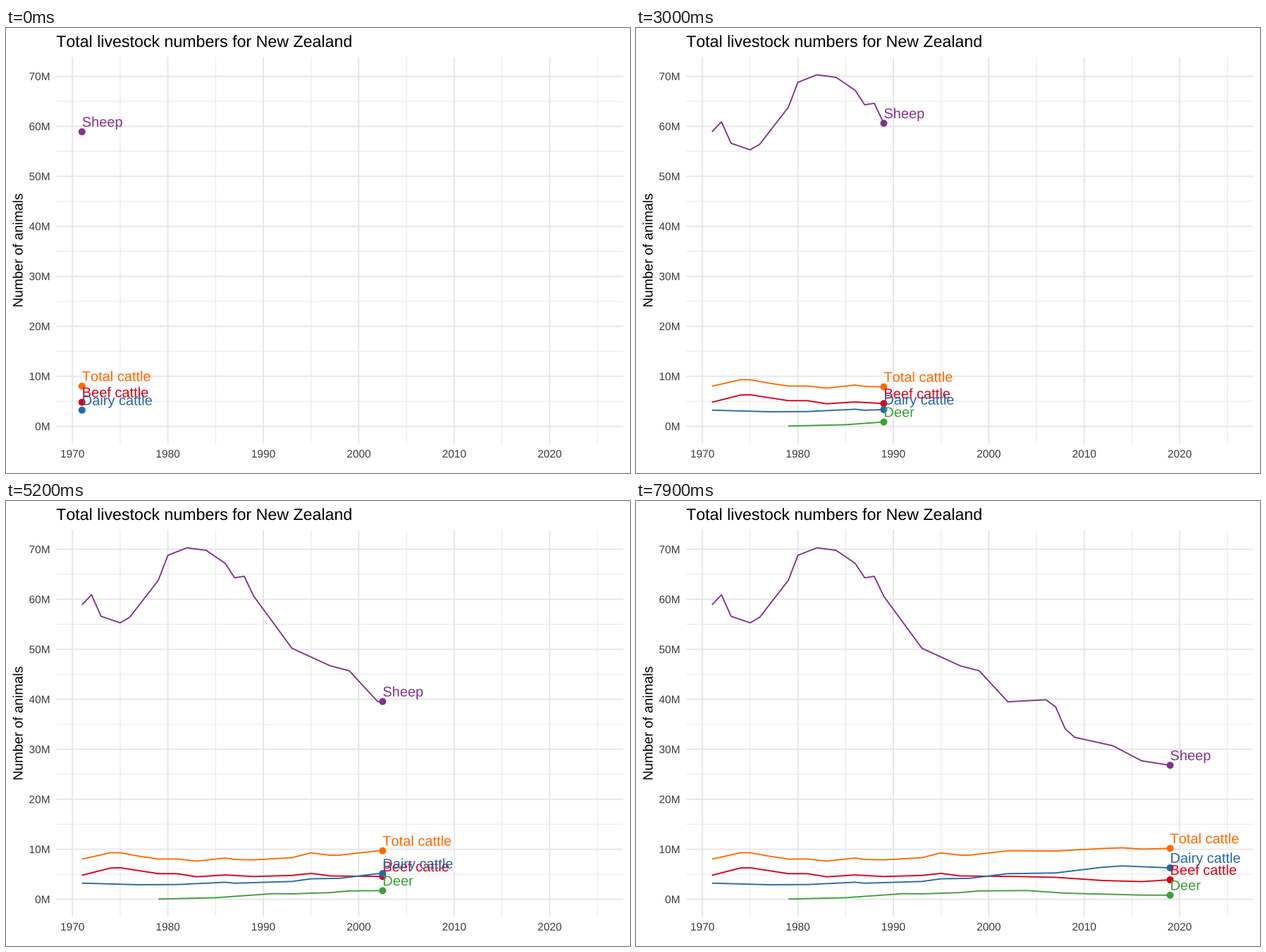
Animation, 885 px wide and 632 px high, one loop 10 s. Source, as a matplotlib script:

```python
import matplotlib.pyplot as plt
import numpy as np
from matplotlib.animation import FuncAnimation
from matplotlib.patches import Circle, PathPatch
from matplotlib.textpath import TextPath
from matplotlib.transforms import Affine2D

WIDTH, HEIGHT, DPI = 885, 632, 64
PT = 72 / DPI  # points per pixel
LEFT, RIGHT, TOP, BOTTOM = 71.2, 875.3, 41.4, 590.2
FIRST, LAST = 1971, 2019
FRAMES, INTERVAL, LAST_MOVE = 100, 100, 79
TITLE, AXIS_TITLE, TICK, NAME = 23.18, 19.32, 15.45, 20

plt.rcParams.update({
    "font.family": "Liberation Sans",
    "text.kerning_factor": 6,
    "toolbar": "None",
})


def x_px(year):
    return LEFT + (year - 1968.3) * (RIGHT - LEFT) / 59.4


def y_px(millions):
    return 565.6 - 7.1 * millions


def yearly(*keys):
    """Yearly values in millions, linear between (year, value) turning points."""
    key_years, values = zip(*keys)
    years = np.arange(key_years[0], LAST + 1)
    return years, np.interp(years, key_years, values)


def text_path(text, size, x=0):
    return TextPath((x, 0), text, size=size)


def advance(text, size):
    longer, stop = (text_path(s, size).get_extents().x1 for s in (text + ".", "."))
    return longer - stop


def place(patch, x, y, angle=0):
    flip = Affine2D().scale(1, -1).rotate_deg(angle).translate(x, y)
    patch.set_transform(flip + ax.transData)


def label(x, y, text, size, color="black", align=0, angle=0):
    path = text_path(text, size, -align * advance(text, size))
    patch = ax.add_patch(PathPatch(path, fc=color, lw=0, zorder=4, snap=False))
    place(patch, x, y, angle)
    return patch


def grid(years, millions, width):
    style = dict(color="#e6e6e6", lw=width * PT, zorder=1, snap=False,
                 solid_capstyle="butt")
    for m in millions:
        ax.plot([LEFT, RIGHT], [y_px(m)] * 2, **style)
    for year in years:
        ax.plot([x_px(year)] * 2, [TOP, BOTTOM], **style)


class Series:
    def __init__(self, name, color, years, values):
        self.years, self.values = years, values
        self.line, = ax.plot([], [], color=color, lw=1.87 * PT, zorder=2,
                             solid_capstyle="butt", solid_joinstyle="round")
        self.dot = ax.add_patch(Circle((0, 0), 5, fc=color, lw=0, zorder=3))
        self.label = label(0, 0, name, NAME, color)

    def show(self, year):
        visible = year >= self.years[0]
        for artist in (self.line, self.dot, self.label):
            artist.set_visible(visible)
        past = self.years < year
        x, y = x_px(year), y_px(np.interp(year, self.years, self.values))
        self.line.set_data(np.append(x_px(self.years[past]), x),
                           np.append(y_px(self.values[past]), y))
        self.dot.center = x, y
        place(self.label, x, y - 7.2)


fig = plt.figure(figsize=(WIDTH / DPI, HEIGHT / DPI), dpi=DPI, facecolor="white")
ax = fig.add_axes([0, 0, 1, 1])
ax.set(xlim=(0, WIDTH), ylim=(HEIGHT, 0), autoscale_on=False)
ax.axis("off")

decades, tens = range(1970, 2021, 10), range(0, 71, 10)
grid(range(1975, 2026, 10), range(5, 66, 10), 0.94)
grid(decades, tens, 1.87)

label(LEFT, 26.9, "Total livestock numbers for New Zealand", TITLE)
label(23.5, (TOP + BOTTOM) / 2, "Number of animals", AXIS_TITLE,
      align=0.5, angle=-90)
for decade in decades:
    label(x_px(decade), 610, str(decade), TICK, "#3c3c3c", align=0.5)
for m in tens:
    label(62.6, y_px(m) + 5.5, f"{m}M", TICK, "#3c3c3c", align=1)

sheep = yearly(
    (1971, 58.9), (1972, 60.9), (1973, 56.6), (1975, 55.3), (1976, 56.4),
    (1979, 63.8), (1980, 68.8), (1982, 70.3), (1984, 69.8), (1986, 67.2),
    (1987, 64.3), (1988, 64.6), (1989, 60.6), (1993, 50.2), (1997, 46.7),
    (1999, 45.7), (2002, 39.5), (2006, 39.9), (2007, 38.5), (2008, 34.1),
    (2009, 32.4), (2013, 30.7), (2016, 27.7), (2019, 26.8))
beef = yearly(
    (1971, 4.8), (1974, 6.25), (1975, 6.3), (1979, 5.12), (1981, 5.11),
    (1983, 4.5), (1986, 4.85), (1989, 4.55), (1993, 4.76), (1995, 5.18),
    (1997, 4.66), (2003, 4.55), (2007, 4.39), (2012, 3.74), (2016, 3.53),
    (2019, 3.89))
dairy = yearly(
    (1971, 3.22), (1977, 2.9), (1981, 2.94), (1986, 3.4), (1987, 3.21),
    (1993, 3.56), (1995, 4.09), (1998, 4.18), (2002, 5.12), (2007, 5.26),
    (2012, 6.42), (2014, 6.66), (2019, 6.28))
deer = yearly(
    (1979, 0.04), (1985, 0.31), (1991, 1.12), (1993, 1.08), (1997, 1.33),
    (1999, 1.67), (2004, 1.74), (2008, 1.22), (2016, 0.83), (2019, 0.81))
cattle = beef[0], beef[1] + dairy[1]

series = [
    Series("Beef cattle", "#da0016", *beef),
    Series("Dairy cattle", "#2668a9", *dairy),
    Series("Deer", "#3da037", *deer),
    Series("Sheep", "#82328f", *sheep),
    Series("Total cattle", "#ff6900", *cattle),
]

# Each year lands on a whole frame; frames between are interpolated
all_years = np.arange(FIRST, LAST + 1)
year_frames = np.round((all_years - FIRST) * LAST_MOVE / (LAST - FIRST))


def update(frame):
    year = np.interp(frame, year_frames, all_years)
    for item in series:
        item.show(year)
    return []


anim = FuncAnimation(fig, update, frames=FRAMES, interval=INTERVAL,
                     repeat=True, repeat_delay=0, blit=False)
plt.show()
```
